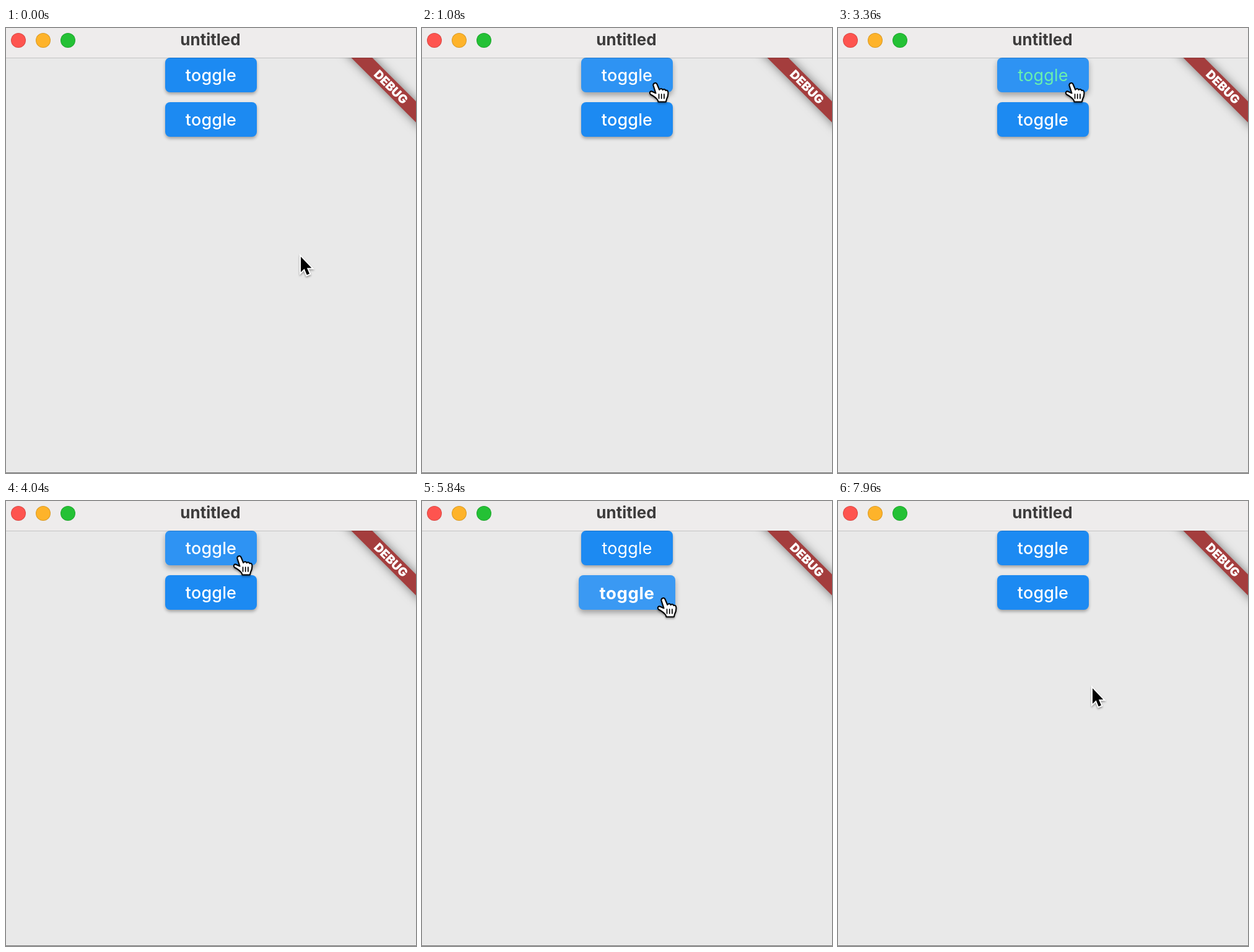
An HTML page for the animation above (8000 ms loop, 662 px wide and 720 px high).

```html
<!DOCTYPE html>
<html lang="en">
<head>
<meta charset="utf-8">
<title>untitled</title>
<style>
  html, body { margin: 0; width: 100%; height: 100%; overflow: hidden; background: #e9e9e9; }
  body { position: relative; font-family: Inter, Roboto, sans-serif; }
  .bar {
    position: absolute; inset: 0 0 auto; height: 48px; box-sizing: border-box;
    background: #eeecec; border-bottom: 1px solid #eeecec;
  }
  .title {
    position: absolute; left: 0; width: 660px; top: 3px; text-align: center;
    font-size: 26px; font-weight: 700; line-height: 32px; color: #3d3c3c;
  }
  .light {
    position: absolute; top: 8px; left: var(--x); width: 24px; height: 24px; box-sizing: border-box;
    border-radius: 50%; border: 1px solid rgba(0, 0, 0, .14); background: var(--c);
  }
  .content { position: absolute; inset: 48px 0 0; overflow: hidden; }
  .content::after {
    content: ""; position: absolute; inset: 0; pointer-events: none;
    border-top: 1px solid rgba(0, 0, 0, .16); border-bottom: 1px solid #747474;
  }

  .button {
    position: absolute; top: var(--y); left: 257px; width: 148px; height: 56px;
    border-radius: 8px; background: #1c8af2;
    box-shadow: 0 3px 5px rgba(0, 0, 0, .3);
  }
  .ink { position: absolute; inset: 0; border-radius: 8px; overflow: hidden; }
  .hover { position: absolute; inset: 0; background: #fff; opacity: 0; }
  .ripple {
    position: absolute; left: calc(var(--x) - 100px); top: calc(var(--cy) - 100px);
    width: 200px; height: 200px; border-radius: 50%; background: #fff; opacity: 0;
    animation: ripple 8s linear calc(var(--at) - 8s) infinite;
  }
  .label {
    position: absolute; inset: 1px 0 -1px; text-align: center; line-height: 56px; white-space: nowrap;
    font-size: 27px; font-weight: 500; letter-spacing: .15px; color: #fff;
  }
  .first { animation: lift1 8s linear infinite; }
  .first .hover { animation: hover1 8s linear infinite; }
  .first .label { animation: tint 8s linear infinite, thin 8s step-end infinite; }
  .second { animation: lift2 8s linear infinite, widen 8s linear infinite; }
  .second .hover { animation: hover2 8s linear infinite; }
  .second .label { animation: embolden 8s linear infinite; }

  .banner {
    position: absolute; left: 100%; top: 0; width: 0; height: 0; transform: rotate(45deg);
  }
  .banner span {
    position: absolute; left: -90px; top: 50.3px; width: 180px; height: 24px;
    background: #a43d3d; box-shadow: 0 0 16px rgba(0, 0, 0, .5);
    color: #fff; font-size: 19.5px; font-weight: 900; line-height: 24px;
    text-align: center; text-indent: 10px;
  }

  .cursor {
    position: absolute; left: 0; top: 0; width: 1px; height: 1px; overflow: visible;
    filter: drop-shadow(0 2px 1.5px rgba(0, 0, 0, .35));
    animation: travel 8s linear infinite;
  }
  .arrow { animation: arrow 8s step-end infinite; }
  .hand { animation: hand 8s step-end infinite; }

  @keyframes travel {
    0%, 4.5% { transform: translate(475px, 367px); animation-timing-function: cubic-bezier(.4, 0, .3, 1); }
    10%, 53.5% { transform: translate(375px, 89px); animation-timing-function: ease-in-out; }
    58.5%, 61% { transform: translate(387px, 153px); }
    62.5%, 94.5% { transform: translate(388px, 157px); }
    97% { transform: translate(395px, 229px); }
    99.5%, 100% { transform: translate(410px, 300px); }
  }
  @keyframes arrow {
    0%, 55.3%, 95.3% { opacity: 1; }
    7.5%, 55.9% { opacity: 0; }
    100% { opacity: 1; }
  }
  @keyframes hand {
    0%, 55.3%, 95.3% { opacity: 0; }
    7.5%, 55.9% { opacity: 1; }
    100% { opacity: 0; }
  }
  @keyframes hover1 {
    0%, 9%, 56%, 100% { opacity: 0; }
    10%, 55.3% { opacity: .08; }
  }
  @keyframes hover2 {
    0%, 56%, 96%, 100% { opacity: 0; }
    57%, 95.3% { opacity: .08; }
  }
  @keyframes lift1 {
    0%, 9%, 57.5%, 100% { box-shadow: 0 3px 5px rgba(0, 0, 0, .3); }
    11.5%, 18.5%, 23%, 42%, 46.5%, 55.3% { box-shadow: 0 5px 9px rgba(0, 0, 0, .3); }
    20.5%, 44% { box-shadow: 0 9px 16px rgba(0, 0, 0, .3); }
  }
  @keyframes lift2 {
    0%, 56%, 98%, 100% { box-shadow: 0 3px 5px rgba(0, 0, 0, .3); }
    58.5%, 68.5%, 73%, 87%, 92%, 95.3% { box-shadow: 0 5px 9px rgba(0, 0, 0, .3); }
    70.5%, 89.5% { box-shadow: 0 9px 16px rgba(0, 0, 0, .3); }
  }
  @keyframes tint {
    0%, 19.5%, 45.5%, 100% { color: #fff; }
    22%, 43% { color: #69f0ae; }
  }
  @keyframes thin {
    0%, 44%, 90.5%, 100% { font-weight: 500; }
    20.5%, 70.5% { font-weight: 400; }
  }
  @keyframes widen {
    0%, 69.5%, 92%, 100% { left: 257px; width: 148px; }
    72%, 89.5% { left: 253px; width: 156px; }
  }
  @keyframes embolden {
    0%, 69.5%, 92%, 100% { font-size: 27px; font-weight: 500; letter-spacing: .15px; }
    72%, 89.5% { font-size: 27.5px; font-weight: 700; letter-spacing: .6px; }
  }
  @keyframes ripple {
    0% { opacity: 0; transform: scale(.35); }
    1% { opacity: .1; }
    2% { opacity: .1; transform: scale(.6); }
    3% { opacity: .1; }
    5% { transform: scale(1.5); }
    6.7%, 100% { opacity: 0; transform: scale(1.5); }
  }
</style>
</head>
<body>
  <div class="bar">
    <i class="light" style="--x: 8px; --c: #fe544f"></i>
    <i class="light" style="--x: 48px; --c: #feb32a"></i>
    <i class="light" style="--x: 88px; --c: #24c135"></i>
    <div class="title">untitled</div>
  </div>
  <div class="content">
    <div class="button first" style="--y: 0px">
      <div class="ink" style="--x: 118px; --cy: 41px">
        <div class="hover"></div>
        <div class="ripple" style="--at: 1.48s"></div>
        <div class="ripple" style="--at: 3.36s"></div>
      </div>
      <div class="label">toggle</div>
    </div>
    <div class="button second" style="--y: 72px">
      <div class="ink" style="--x: 131px; --cy: 37px">
        <div class="hover"></div>
        <div class="ripple" style="--at: 5.48s"></div>
        <div class="ripple" style="--at: 6.96s"></div>
      </div>
      <div class="label">toggle</div>
    </div>
    <div class="banner"><span>DEBUG</span></div>
  </div>
  <svg class="cursor">
    <path class="arrow" d="M1 3V28L6.7 22.6L10.8 32.4L15 30.6L10.9 21.2H18.3Z"
      fill="#000" stroke="#fff" stroke-width="4" paint-order="stroke"/>
    <g class="hand" stroke="#000" stroke-width="2" stroke-linejoin="round" stroke-linecap="round">
      <path fill="#fff" d="M-1.5 4C-2.2 0 3 -1.5 4.5 2L8.3 11C10 8.5 13 9 13.5 11.2C15 9.5 18 10 18.5 12.2
        C20.5 11.2 22 12.5 22.3 15C22.8 20 22 22 20 26L18.8 30.5H6.5L5.5 27.5C2 23 -1 21 -6 18.5
        C-8.5 16 -6.5 12.8 -4 13.5L2.5 16.5Z"/>
      <path fill="none" stroke-width="1.7" d="M7.5 18V25M11.7 18V25M15.9 18V25"/>
    </g>
  </svg>
</body>
</html>
```
